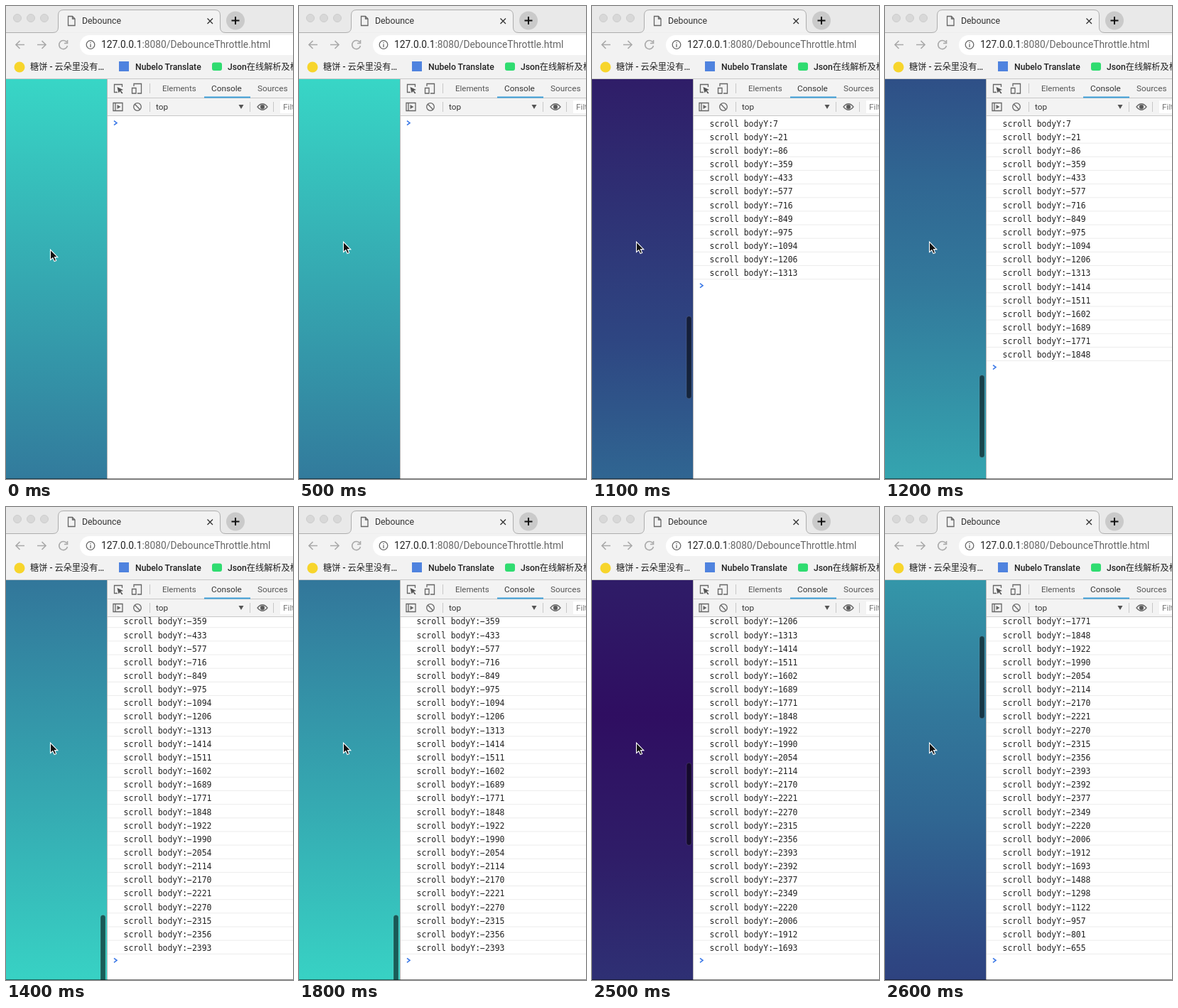
An HTML page that plays this animation: 404 by 666 pixels, repeating every 2.7 s.

```html
<!DOCTYPE html>
<html lang="en">
<head>
<meta charset="utf-8">
<title>Debounce</title>
<style>
  html, body { margin: 0; width: 100%; height: 100%; overflow: hidden; background: #fff; }
  svg { display: block; font: 11.8px Roboto, "Noto Sans CJK SC", "Noto Sans CJK", sans-serif; fill: #333; }
  .line { fill: none; stroke: #666; stroke-width: 1.3; }
  .rule { fill: none; stroke: #c8c8c8; }
  .mark { font-size: 12.2px; fill: #222; font-weight: 500; }
  #rows { font: 11.45px "DejaVu Sans Mono", monospace; fill: #222; }
</style>
</head>
<body>
<svg width="404" height="666" viewBox="0 0 404 666">
  <defs>
    <linearGradient id="sky" x1="0" y1="0" x2="0" y2="1"></linearGradient>
    <clipPath id="pageClip"><path d="M0 103H142V666H0z"/></clipPath>
    <clipPath id="logClip"><path d="M143 155H404V666H143z"/></clipPath>
  </defs>

  <!-- web page -->
  <g clip-path="url(#pageClip)">
    <rect id="page" width="142" height="2990" fill="url(#sky)"/>
    <rect id="thumb" x="133" width="7" height="116" rx="3.5" fill="#000" fill-opacity=".55" stroke="#fff" stroke-opacity=".12"/>
  </g>

  <!-- console log -->
  <g clip-path="url(#logClip)">
    <g id="rows"></g>
    <path id="prompt" d="M152 -3L156 0L152 3" fill="none" stroke="#3b78e7" stroke-width="1.6"/>
  </g>

  <!-- tab strip -->
  <path d="M0 0H404V38H0z" fill="#e9e9e9"/>
  <path d="M0 38H404V103H0z" fill="#f2f2f2"/>
  <path d="M-1 37.5H66Q73.500 37.500 73.500 30V13Q73.500 5.500 81 5.500H294Q301.500 5.500 301.500 13V30Q301.500 37.500 309 37.500H405" fill="#f2f2f2" stroke="#adadad"/>
  <g fill="#d8d8d8" stroke="#cdcdcd">
    <circle cx="16" cy="17" r="5.500"/><circle cx="35" cy="17" r="5.500"/><circle cx="54" cy="17" r="5.500"/>
  </g>
  <path class="line" d="M87.500 14.500H93.500L97 18V27.500H87.500zM93.500 14.500V18H97"/>
  <text x="107" y="25" font-size="12.3">Debounce</text>
  <path class="line" d="M283.500 17.500L291 25M291 17.500L283.500 25" style="stroke:#333"/>
  <circle cx="323" cy="20.500" r="13" fill="#cacaca"/>
  <path d="M317.500 20.500H328.500M323 15V26" stroke="#111" stroke-width="2"/>

  <!-- address bar -->
  <g class="line" style="stroke:#a9a9a9;stroke-width:1.6">
    <path d="M26 54.500H14M19.500 49L14 54.500L19.500 60M44 54.500H56M50.500 49L56 54.500L50.500 60"/>
    <path d="M85.500 51A6 6 0 1 0 86.500 56M86.500 48V52.500H82"/>
  </g>
  <rect x="104" y="41" width="330" height="28" rx="14" fill="#fff"/>
  <circle class="line" cx="119" cy="54.500" r="5.800"/>
  <path class="line" d="M119 53.500V58M119 51V52.300"/>
  <text x="134" y="59.300" font-size="13.8" fill="#666"><tspan fill="#222">127.0.0.1</tspan>:8080/DebounceThrottle.html</text>

  <!-- bookmarks -->
  <circle cx="19" cy="86" r="7.500" fill="#f7d52c"/>
  <text class="mark" x="34" y="89.500">糖饼 - 云朵里没有…</text>
  <rect x="159" y="78" width="14" height="14" fill="#4f83df"/>
  <text class="mark" x="182" y="89.500">Nubelo Translate</text>
  <rect x="290" y="79.500" width="14" height="11.500" rx="3" fill="#2fdc70"/>
  <text class="mark" x="312" y="89.500">Json在线解析及格式化</text>

  <!-- developer tools -->
  <path d="M142 103H404V155H142z" fill="#f3f3f3"/>
  <path class="rule" d="M0 102.500H404M142 129.500H404M142 154.500H404M202.500 109V123M202.500 135V149M343.500 135V149M376.500 135V149"/>
  <path d="M142.500 103V666" stroke="#b8b8b8"/>
  <path d="M279 127.500H344V129.500H279z" fill="#3d9fd8"/>
  <g class="line">
    <path d="M157 121.500H152.500V110.500H163.500V114"/>
    <path d="M156.500 114L165 118L161.500 119L164.500 122.500L163 123.500L160.500 120L158.500 122.500z" style="fill:#555;stroke:none"/>
    <path d="M177.500 115.500H183V123H177.500zM180 113V109.500H190.500V123H185"/>
    <path d="M151 136.500H164V147.500H151zM154 136.500V147.500"/>
    <path d="M156.500 139L161.500 142L156.500 145z" style="fill:#666;stroke:none"/>
    <circle cx="185" cy="142" r="5.300"/>
    <path d="M181.300 138.300L188.700 145.700"/>
    <path d="M354 142Q361 133.500 368 142Q361 150.500 354 142z"/>
    <circle cx="361" cy="142" r="2.500" style="fill:#555"/>
  </g>
  <text x="220" y="119.800" font-size="11.5" fill="#555">Elements</text>
  <text x="289" y="119.800">Console</text>
  <text x="354" y="119.800" fill="#555">Sources</text>
  <text x="211" y="146">top</text>
  <path d="M327.500 139H334.500L331 145z" fill="#555"/>
  <path d="M386 133H405V151H386z" fill="#fff"/>
  <text x="390" y="146" fill="#777">Filter</text>

  <path d="M0 665H404V666H0z" fill="#000" fill-opacity=".5"/>
  <path id="cursor" d="M0 0V14.500L3.300 11.600L5.600 16.600L8.200 15.500L6 10.600H10.300z" fill="#111" stroke="#fff" stroke-width="1.1"/>
</svg>
<script>
const $ = id => document.getElementById(id);
const NS = "http://www.w3.org/2000/svg";
const ROW = 19.15, HEIGHT = 2990;

// body top at each 60 Hz scroll event: down the page, then back up
const bodyY = [7, -21, -86, -359, -433, -577, -716, -849, -975, -1094, -1206, -1313,
  -1414, -1511, -1602, -1689, -1771, -1848, -1922, -1990, -2054, -2114, -2170, -2221,
  -2270, -2315, -2356, -2393, -2392, -2377, -2349, -2220, -2006, -1912, -1693, -1488,
  -1298, -1122, -957, -801, -655, -515, -385];

function add(parent, tag, attrs, text = "") {
  const el = document.createElementNS(NS, tag);
  for (const k in attrs) el.setAttribute(k, attrs[k]);
  el.textContent = text;
  return parent.appendChild(el);
}

// teal to indigo, mirrored about the middle of the page
const half = [[0, "56,214,198"], [579, "50,120,155"], [730, "48,102,146"],
  [925, "46,70,130"], [1293, "47,29,104"], [1495, "47,14,97"]];
const mirrored = half.slice(0, -1).reverse().map(([y, c]) => [HEIGHT - y, c]);
for (const [y, c] of [...half, ...mirrored])
  add($("sky"), "stop", { offset: y / HEIGHT, "stop-color": `rgb(${c})` });

const rows = bodyY.map((y, i) => {
  const g = add($("rows"), "g", { transform: `translate(0 ${166 + i * ROW})` });
  add(g, "text", { x: 165.5, y: 3.7 }, "scroll bodyY:" + String(y).replace("-", "−"));
  add(g, "path", { d: "M143 8H404", stroke: "#ececec" });
  return g;
});

const move = (id, x, y) => $(id).setAttribute("transform", `translate(${x} ${y})`);
const clamp = (v, lo, hi) => Math.max(lo, Math.min(hi, v));

function draw(t) {
  const down = t < 2400;
  const event = down ? clamp(3 + (t - 900) * .06, 0, 27) : 30 + (t - 2400) * .06;
  const scroll = t < 800 ? 0 : 8 - bodyY[Math.round(event)];
  move("page", 0, 103 - scroll);
  move("thumb", 0, 105 + scroll * .1955);
  $("thumb").style.display = t < 800 ? "none" : "";

  // the console lags a few events behind the page
  const count = t < 900 ? 0
    : Math.round(down ? Math.min(28, 1 + (t - 900) * .055) : 29 + (t - 2400) * .06);
  const shift = Math.max(0, (count - 1) * ROW - 455.3);
  rows.forEach((r, i) => r.style.display = i < count ? "" : "none");
  move("rows", 0, -shift);
  move("prompt", 0, count ? 164.7 + count * ROW - shift - .8 : 164.7);

  const y = t < 100 ? 343 : t < 200 ? 340 : t < 400 ? 337 : t < 500 ? 334 : 332;
  move("cursor", 62.5, y);
}

function tick(now) {
  draw(Math.floor(now % 2700 / 100) * 100);
  requestAnimationFrame(tick);
}
draw(0);
requestAnimationFrame(tick);
</script>
</body>
</html>
```
